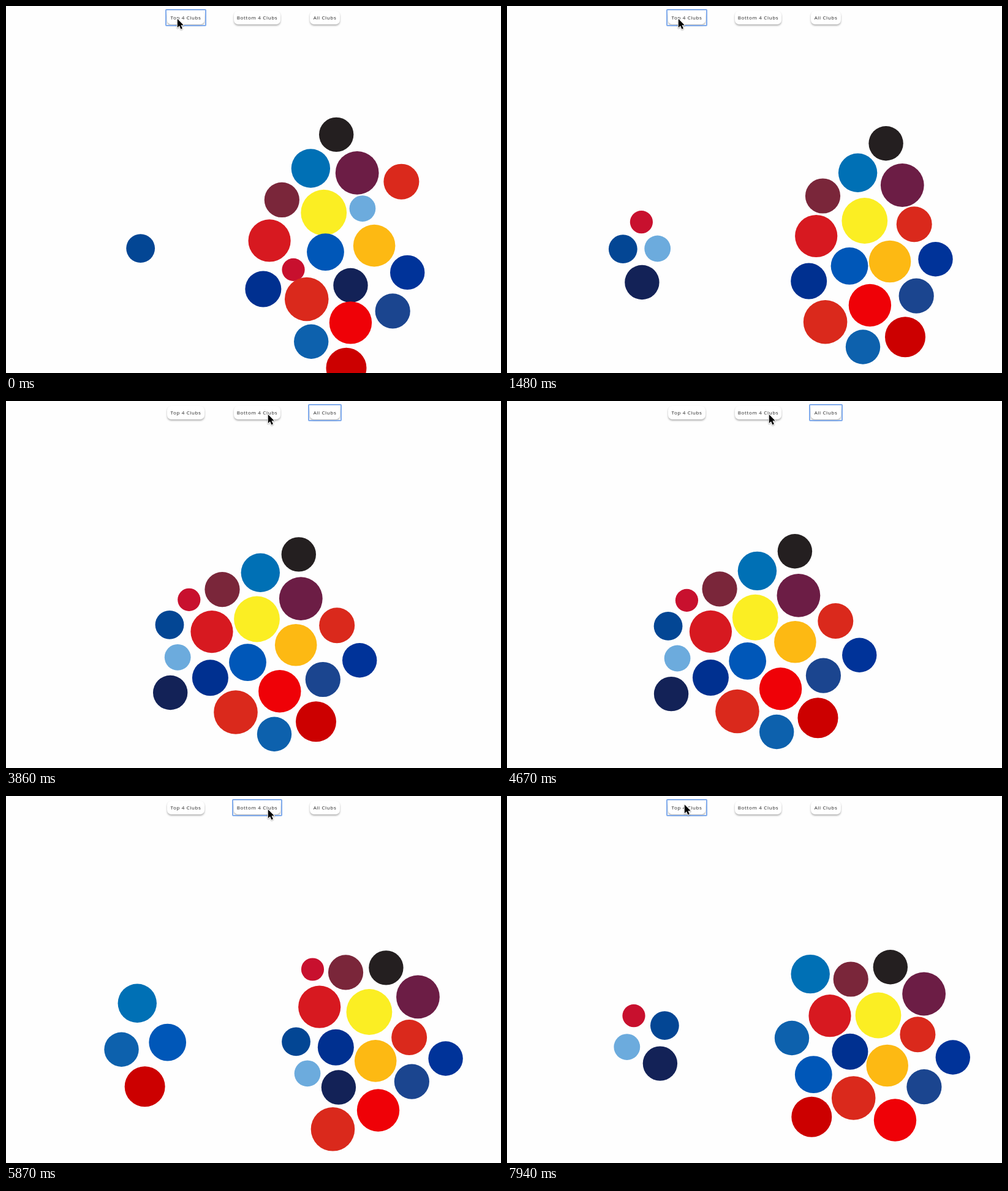
Animation, 808 px wide and 599 px high, one loop 8000 ms. Source, as an HTML page with a canvas:

```html
<!DOCTYPE html>
<html lang="en">
<head>
<meta charset="utf-8">
<title>Club bubbles</title>
<style>
  html, body { margin: 0; width: 100%; height: 100%; overflow: hidden; background: #fefefe; }
  canvas { position: absolute; left: 0; top: 0; pointer-events: none; }
  .button {
    position: absolute; top: 8px; height: 22px;
    font: 500 8px/22px "Open Sans", "Noto Sans", sans-serif;
    letter-spacing: .65px; text-align: center; white-space: nowrap; color: #222;
    background: #fff; border-radius: 7px; box-shadow: 0 2px 3px rgba(0, 0, 0, .3);
  }
  .focus::after {
    content: ""; position: absolute; inset: -3px -3px -3px -3px;
    border: 2px solid #80abec; border-radius: 2px;
  }
</style>
</head>
<body>
<div class="button" style="left:263px;width:61px">Top 4 Clubs</div>
<div class="button" style="left:372px;width:76px">Bottom 4 Clubs</div>
<div class="button" style="left:496px;width:49px">All Clubs</div>
<canvas id="stage" width="808" height="599"></canvas>
<script>
const LOOP = 8000;
const ctx = document.getElementById("stage").getContext("2d");
const buttons = document.querySelectorAll(".button");
const clubs = [];

// Coordinates per club: leaving, top four apart, all, leaving, bottom four apart, top four apart
function club(color, r, ...xy) {
  const poses = [];
  for (let i = 0; i < xy.length; i += 2) poses.push({ x: xy[i], y: xy[i + 1] });
  clubs.push({ color, r, poses });
}

club("#c8102e", 18.6, 470.3, 430.8, 219.4, 352.7, 298.8, 324.3, 414.3, 288, 505.4, 282.7, 207, 358.7);
club("#6cabdd", 21.4, 583.6, 330.2, 245.7, 396, 280.2, 418.3, 414, 406.5, 496.5, 455.5, 195.8, 409.6);
club("#034694", 23.4, 219.8, 395.6, 189.3, 396.7, 267, 365.3, 377.4, 365, 479, 403, 257.4, 374.7);
club("#132257", 28.2, 564.2, 456, 220.4, 451, 268.2, 476, 384, 457.6, 552, 476.6, 249.9, 436.6);
club("#241f20", 28.2, 538.8, 209.8, 618.6, 224.3, 477.8, 250.4, 552.5, 269.3, 624.3, 281, 625.8, 279.3);
club("#0070b5", 31.7, 497, 265, 572.6, 272.3, 415.3, 280.3, 274.5, 287.3, 210.8, 341.2, 495.2, 290.6);
club("#6c1d45", 35.4, 572.8, 272.3, 645.3, 292.5, 481.3, 322.6, 598, 325.8, 676.7, 328, 680.6, 323);
club("#da291c", 29, 645.3, 286.3, 664.7, 356.2, 540.2, 366.2, 622.6, 395, 660.2, 394, 670.4, 389.2);
club("#7a263a", 28.6, 450, 316.5, 515.5, 310, 353, 307.6, 471.3, 278, 559.3, 288.5, 561.2, 299);
club("#fbee23", 37.4, 518.4, 337.2, 583.8, 350.5, 409.5, 356, 518.2, 335.2, 597.2, 353.5, 606, 358);
club("#d71920", 34.6, 429.7, 383, 504.7, 375.5, 336, 376.6, 440, 339, 515.8, 344.5, 527, 358.7);
club("#0057b8", 30.4, 521.3, 401.5, 559, 424.3, 394.5, 426.6, 480.6, 392, 251.3, 402.7, 500.3, 454.7);
club("#fdb913", 34.3, 601, 391, 625, 417, 473.2, 398.2, 549.2, 403.5, 606.3, 434, 620.7, 440);
club("#003399", 28.2, 655, 435, 699.5, 413.3, 577.2, 423.3, 649.6, 458.8, 721.5, 426.7, 727.8, 426.5);
club("#003090", 29.5, 419.5, 462, 492.7, 449, 333.4, 451.7, 453.3, 456.3, 543.2, 407.5, 559.9, 417.2);
club("#da291c", 35.8, 490.6, 478.3, 519.6, 515.7, 375, 508, 450.7, 523, 538.2, 545, 565.7, 493);
club("#ef0107", 34.7, 562.3, 517, 592.4, 488.5, 446.8, 473.7, 515.2, 477.2, 612.8, 515, 633.5, 529);
club("#1b458f", 28.6, 631, 498, 668.2, 473.2, 517.3, 454.5, 582.8, 468, 666.9, 466, 680.9, 474.7);
club("#0d61ad", 28.2, 497.8, 547.7, 581, 556.5, 438, 543.7, 299, 537.7, 182.2, 406.6, 465, 395);
club("#cc0000", 33, 555, 591, 650, 540.2, 506, 523.3, 377.9, 566.4, 218, 469, 497.3, 523.7);

const clamp = v => Math.min(1, Math.max(0, v));
const mix = (a, b, k) => a + (b - a) * k;
const blend = (p, q, k) => ({ x: mix(p.x, q.x, k), y: mix(p.y, q.y, k) });

// Damped pull towards a target, t ms after release
function pull(t) {
  if (t <= 0) return 0;
  const slow = 200, fast = 35;
  return 1 - (slow * Math.exp(-t / slow) - fast * Math.exp(-t / fast)) / (slow - fast);
}

// Share of the way from time a to time b for a pull released at start
function share(t, start, a, b) {
  const from = pull(a - start);
  return clamp((pull(t - start) - from) / (pull(b - start) - from));
}

function turn(p, cx, cy, angle, dx, dy) {
  const x = p.x - cx, y = p.y - cy;
  return { x: p.x + angle * y + dx, y: p.y - angle * x + dy };
}

// Settled clusters keep turning slowly
function driftApart(p, k) {
  return p.x < 400
    ? turn(p, 218, 400, -.03 * k, -k, -2.4 * k)
    : turn(p, 595, 385, .03 * k, 0, 0);
}
const driftAll = (p, k) => turn(p, 410, 400, .05 * k, -4 * k, -4 * k);

function place({ poses: p }, t) {
  if (t < 1480) return blend(p[0], p[1], share(t, -260, 0, 1480));
  if (t < 3070) return driftApart(p[1], (t - 1480) / 1450);
  if (t < 3860) return blend(driftApart(p[1], 1.1), p[2], share(t, 3070, 3070, 3860));
  if (t < 5040) return driftAll(p[2], (t - 3860) / 1180);
  if (t < 5290) return blend(driftAll(p[2], 1), p[3], share(t, 5040, 5040, 5290));
  if (t < 7130) return blend(p[3], p[4], share(t, 5040, 5290, 6720));
  return blend(p[4], p[5], share(t, 7130, 7130, 7940));
}

// Push overlapping bubbles apart
function separate(dots) {
  for (let pass = 0; pass < 4; pass++) {
    dots.forEach((a, i) => {
      for (const b of dots.slice(i + 1)) {
        const dx = b.x - a.x, dy = b.y - a.y;
        const gap = Math.hypot(dx, dy) || 1;
        const over = a.r + b.r - 4 - gap;
        if (over <= 0) continue;
        const push = over * .5 / gap;
        const part = b.r * b.r / (a.r * a.r + b.r * b.r);
        a.x -= dx * push * part;
        a.y -= dy * push * part;
        b.x += dx * push * (1 - part);
        b.y += dy * push * (1 - part);
      }
    });
  }
}

const pointerPath = [
  [0, 279, 20], [2120, 279, 20], [2550, 503, 18], [3340, 503, 18],
  [3750, 427, 21], [6660, 427, 21], [6720, 423, 20], [7020, 289, 13], [LOOP, 289, 13]
];

function pointerAt(t) {
  const i = pointerPath.findIndex(k => k[0] > t);
  const [t0, x0, y0] = pointerPath[i - 1], [t1, x1, y1] = pointerPath[i];
  const u = (t - t0) / (t1 - t0), k = u * u * (3 - 2 * u);
  return { x: mix(x0, x1, k), y: mix(y0, y1, k) };
}

const arrow = new Path2D("M.8 1V15.2L4 12.2L6.5 17.7L8.9 16.6L6.5 11.3H10.8Z");

function drawPointer({ x, y }) {
  ctx.save();
  ctx.translate(x, y);
  ctx.lineJoin = "round";
  ctx.lineWidth = 2;
  ctx.strokeStyle = "#fff";
  ctx.shadowColor = "rgba(0,0,0,.35)";
  ctx.shadowBlur = 2;
  ctx.shadowOffsetY = 1;
  ctx.stroke(arrow);
  ctx.shadowColor = "transparent";
  ctx.fillStyle = "#000";
  ctx.fill(arrow);
  ctx.restore();
}

function focusAt(t) {
  if (t < 2880 || t >= 7050) return 0;
  return t < 4960 ? 2 : 1;
}

function draw(t) {
  ctx.clearRect(0, 0, 808, 599);
  const dots = clubs.map(c => ({ ...place(c, t), r: c.r, color: c.color }));
  separate(dots);
  for (const d of dots) {
    ctx.fillStyle = d.color;
    ctx.beginPath();
    ctx.arc(d.x, d.y, d.r, 0, Math.PI * 2);
    ctx.fill();
  }
  const focus = focusAt(t);
  buttons.forEach((b, i) => b.classList.toggle("focus", i === focus));
  drawPointer(pointerAt(t));
}

const begin = performance.now();
function tick() {
  draw((performance.now() - begin) % LOOP);
  requestAnimationFrame(tick);
}
tick();
</script>
</body>
</html>
```
